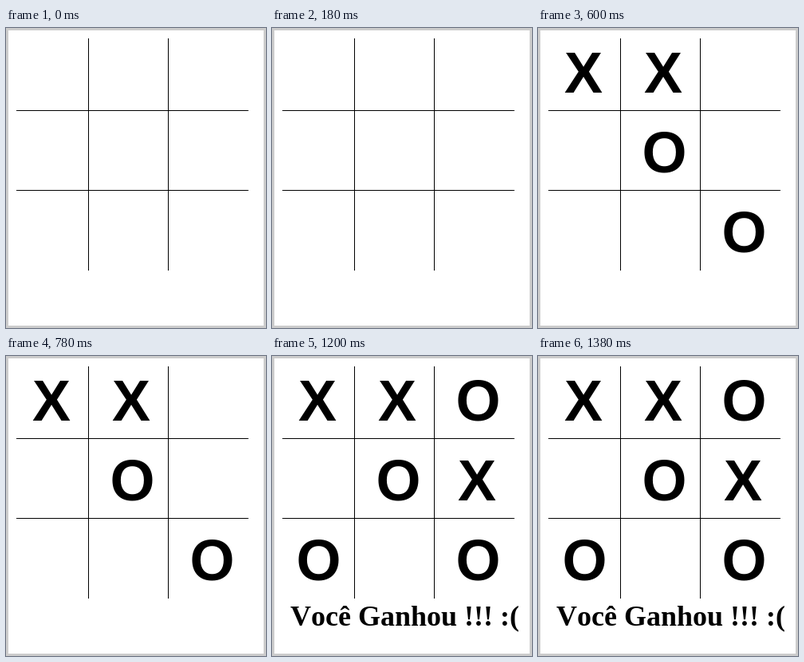
These frames come from a looping animation (326 by 376 pixels, 1500 ms). An HTML page with a canvas:

```html
<!DOCTYPE html>
<html lang="pt">
<head>
<meta charset="utf-8">
<title>Jogo da velha</title>
<style>
html, body { margin: 0; width: 100%; height: 100%; overflow: hidden; background: #fff; }
canvas { display: block; }
</style>
</head>
<body>
<canvas id="board" width="326" height="376"></canvas>
<script>
const ctx = document.getElementById('board').getContext('2d');
const STEP = 300, STEPS = 5, CELL = 100;

// [step, mark, column, row]
const moves = [
  [1, 'X', 1, 0], [1, 'O', 1, 1],
  [2, 'X', 0, 0], [2, 'O', 2, 2],
  [3, 'X', 2, 1], [3, 'O', 2, 0],
  [4, 'O', 0, 2]
];
const markX = { X: 33, O: 30.5 };

function drawGrid() {
  ctx.fillStyle = '#ccc';
  ctx.fillRect(0, 0, 326, 376);
  ctx.fillStyle = '#fff';
  ctx.fillRect(3, 3, 320, 370);
  ctx.fillStyle = '#000';
  for (const p of [103, 203]) {
    ctx.fillRect(p, 13, 1, 291);
    ctx.fillRect(13, p, 291, 1);
  }
}

function draw(step) {
  drawGrid();
  ctx.fontKerning = 'none';
  ctx.font = 'bold 72px "Liberation Sans", Arial, sans-serif';
  for (const [from, mark, col, row] of moves) {
    if (step >= from) ctx.fillText(mark, markX[mark] + col * CELL, 81 + row * CELL);
  }
  if (step === STEPS - 1) {
    ctx.font = 'bold 36px "Liberation Serif", Times, serif';
    ctx.fillText('Você Ganhou !!! :(', 23, 338);
  }
}

const start = performance.now();
let shown = -1;

function tick() {
  const step = Math.floor((performance.now() - start) / STEP) % STEPS;
  if (step !== shown) draw(shown = step);
  requestAnimationFrame(tick);
}
tick();
</script>
</body>
</html>
```
